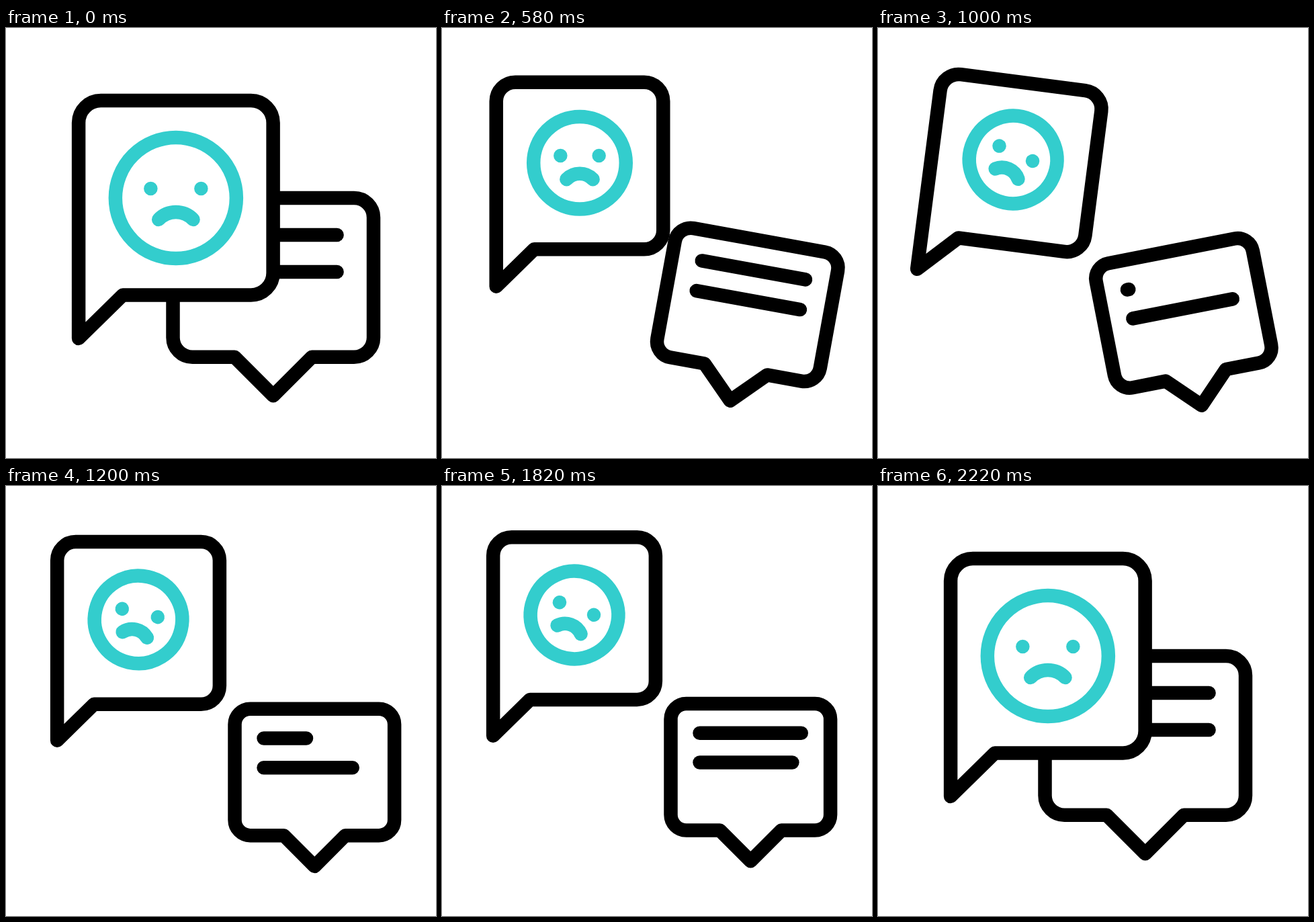
An HTML page with a canvas for the animation above (2.4 s loop, 640 px wide and 640 px high).

```html
<!DOCTYPE html>
<html lang="en">
<head>
<meta charset="utf-8">
<title>Speech bubbles</title>
<style>
  html, body { margin: 0; width: 100%; height: 100%; overflow: hidden; background: #fff; }
  canvas { display: block; width: 640px; height: 640px; }
</style>
</head>
<body>
<canvas id="stage" width="640" height="640"></canvas>
<script>
const ctx = document.getElementById('stage').getContext('2d');
const LOOP = 2400, BLACK = '#000', TEAL = '#33cdcd';

const mix = (a, b, p) => a + (b - a) * p;

// Eased 0 to 1 between two times.
function ramp(t, from, to) {
  const x = Math.min(1, Math.max(0, (t - from) / (to - from)));
  return x * x * (3 - 2 * x);
}

// Rises to 1 at the peak and falls back to 0.
const hump = (t, from, peak, to) => ramp(t, from, peak) - ramp(t, peak, to);

// Jumps up, sinks below the rest position, rises again and settles.
const bob = (t, up, down) =>
  -up * (ramp(t, 700, 800) - ramp(t, 1480, 1820)) + (up + down) * hump(t, 800, 1100, 1480);

// A bubble centred on x = 0 with rounded corners and a tail on the bottom edge.
function bubble(halfWidth, top, bottom, radius, tail) {
  const path = new Path2D();
  path.moveTo(0, top);
  path.arcTo(halfWidth, top, halfWidth, bottom, radius);
  path.arcTo(halfWidth, bottom, 0, bottom, radius);
  tail(path);
  path.arcTo(-halfWidth, top, 0, top, radius);
  path.closePath();
  return path;
}

const leftShape = bubble(144.75, -177, 112.5, 33, path => {
  path.lineTo(-79, 112.5);
  path.lineTo(-144.75, 177);
});
const rightShape = bubble(149.25, -147, 89.7, 29, path => {
  path.lineTo(57.5, 89.7);
  path.lineTo(0, 147.3);
  path.lineTo(-57.5, 89.7);
  path.arcTo(-149.25, 89.7, -149.25, -147, 29);
});
// Ring, two dots for eyes, and the mouth.
const faceShape = new Path2D(
  'M90 0A90 90 0 1 1-90 0A90 90 0 1 1 90 0Z' +
  'M-37.5-14h.02M37.5-14h.02M-25.7 32A35.6 35.6 0 0 1 25.7 32');

// Strokes keep their width whatever the scale of the shape.
function draw(shape, matrix, scale, color, filled) {
  const path = new Path2D();
  path.addPath(shape, matrix.scale(scale));
  if (filled) {
    ctx.fillStyle = '#fff';
    ctx.fill(path);
  }
  ctx.strokeStyle = color;
  ctx.stroke(path);
}

const place = (x, y, angle) => new DOMMatrix().translate(x, y).rotate(angle);

function drawRight(t, apart) {
  const tilt = 12 * (ramp(t, 200, 700) - ramp(t, 720, 960)
    - hump(t, 720, 960, 1200) + hump(t, 1200, 1440, 1700));
  const matrix = place(mix(397.75, 459.3, apart), mix(400, 441, apart) + bob(t, 12.5, 12), tilt);
  const scale = mix(1, 0.796, apart);
  draw(rightShape, matrix, scale, BLACK, true);

  // Each line is erased, then written again; the second follows the first.
  for (let i = 0; i < 2; i++) {
    const erased = 960 + 420 * i;
    const size = 1 - hump(t, 760 + 390 * i, erased, erased + 540);
    if (size <= 0) continue;
    const line = new Path2D();
    line.moveTo(-95.2, -92 + 55 * i);
    line.lineTo(-95.2 + 190 * size, -92 + 55 * i);
    draw(line, matrix, scale, BLACK);
  }
}

function drawLeft(t, apart) {
  const tilt = 8 * (hump(t, 720, 960, 1200) - hump(t, 1200, 1440, 1700));
  const matrix = place(mix(252.85, 197, apart), mix(285, 224, apart) + bob(t, 25, 13.6), tilt);
  draw(leftShape, matrix, mix(1, 0.835, apart), BLACK, true);

  const roll = 20 * (hump(t, 700, 1100, 1480) - hump(t, 1100, 1480, 1820) + hump(t, 1480, 1820, 2220));
  draw(faceShape, matrix.translate(0, -32).rotate(roll), mix(1, 0.725, apart), TEAL);
}

function render(t) {
  const apart = ramp(t, 200, 700) - ramp(t, 1820, 2220);
  ctx.fillStyle = '#fff';
  ctx.fillRect(0, 0, 640, 640);
  ctx.lineWidth = 20.5;
  ctx.lineCap = ctx.lineJoin = 'round';
  drawRight(t, apart);
  drawLeft(t, apart);
}

const start = performance.now();
function tick() {
  render((performance.now() - start) % LOOP);
  requestAnimationFrame(tick);
}
tick();
</script>
</body>
</html>
```
